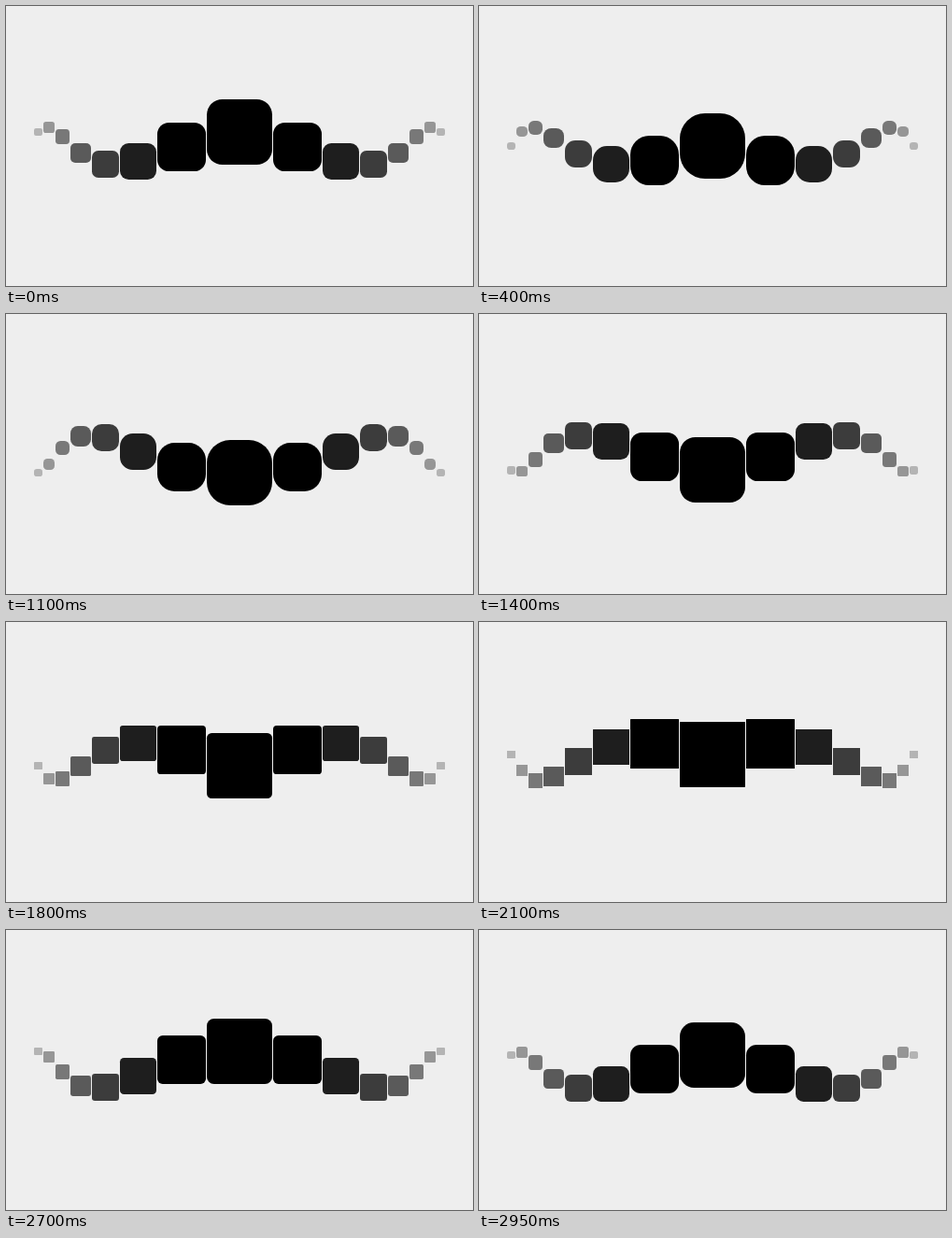
Animation of 500x300 px, one loop 3 s. Source, as an HTML page:

```html
<!DOCTYPE html>
<html lang="en">
<head>
<meta charset="utf-8">
<title>Wave of squares</title>
<style>
  html, body { margin: 0; width: 100%; height: 100%; overflow: hidden; background: #eee; }
  #stage { position: relative; width: 500px; height: 300px; overflow: hidden; }
  #stage div { position: absolute; }
</style>
</head>
<body>
<div id="stage"></div>
<script>
  const LOOP = 3000, TICK = 50, GAP = 1;
  const widths = [70, 52, 39, 29, 22, 15, 12, 9];
  const heights = [70, 52.4, 38.8, 29, 21.4, 15.8, 11.7, 8.6];
  const stage = document.getElementById('stage');
  const wave = turns => Math.sin(2 * Math.PI * turns);

  function addBox(ring, left) {
    const box = document.createElement('div');
    const grey = 30 * Math.max(0, ring - 1);
    box.style.cssText =
      `left:${left}px;width:${widths[ring]}px;background:rgb(${grey},${grey},${grey})`;
    stage.append(box);
    return { ring, style: box.style };
  }

  // Build outward from the centre, mirrored on both sides.
  const boxes = [addBox(0, 215)];
  let left = 215;
  for (let ring = 1; ring < widths.length; ring++) {
    left -= widths[ring] + GAP;
    boxes.push(addBox(ring, left), addBox(ring, 500 - left - widths[ring]));
  }

  function draw(t) {
    const radius = 21.5 + 21 * wave((t + 50) / LOOP);
    for (const { ring, style } of boxes) {
      const middle = 150 + 20 * wave((t - 400) / LOOP + ring / 7);
      const top = Math.round(middle - heights[ring] / 2);
      const bottom = Math.round(middle + heights[ring] / 2);
      style.top = top + 'px';
      style.height = bottom - top + 'px';
      style.borderRadius = radius + '%';
    }
  }

  const start = performance.now();
  function frame() {
    const t = (performance.now() - start) % LOOP;
    draw(Math.floor(t / TICK) * TICK);
    requestAnimationFrame(frame);
  }
  draw(0);
  requestAnimationFrame(frame);
</script>
</body>
</html>
```
